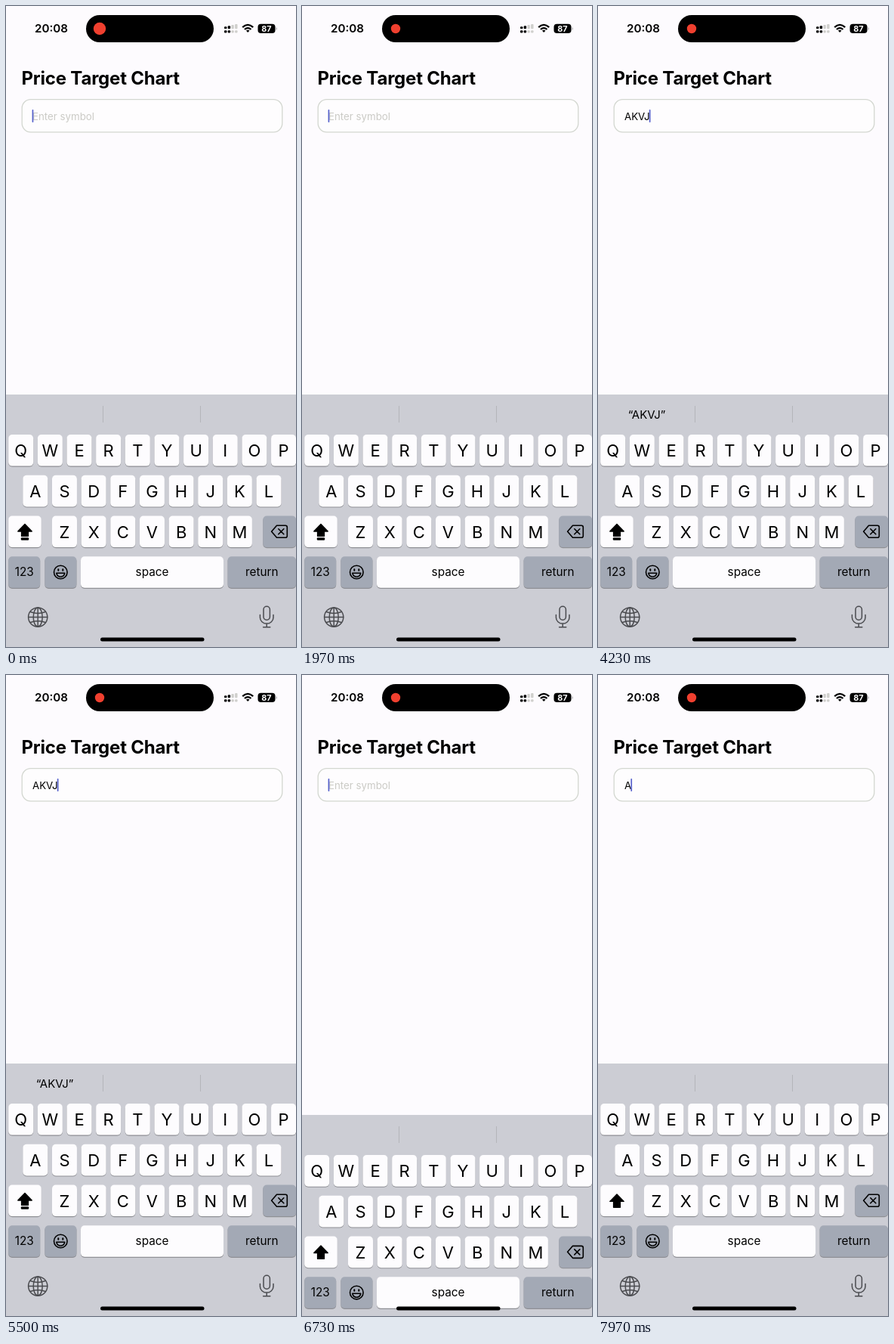
An HTML page that plays this animation: 384x848 px, repeating every 8 s.

```html
<!DOCTYPE html>
<html lang="en">
<head>
<meta charset="utf-8">
<title>Price Target Chart</title>
<style>
  html, body { margin: 0; width: 100%; height: 100%; overflow: hidden; background: #fdfbfe; }
  svg { display: block; width: 100vw; height: 100vh; }
  text { font-family: Inter, Roboto, sans-serif; fill: #000; }
  .mid { text-anchor: middle; }
  .letter { font-size: 22px; }
  .label { font-size: 15.3px; }
  .key { fill: #fdfcfe; }
  .special { fill: #a3a9b5; }
  .line { fill: none; stroke: #000; stroke-linecap: round; stroke-linejoin: round; }
  .soft { stroke: #4a4b4f; stroke-width: 1.5; }
</style>
</head>
<body>
<svg viewBox="0 0 384 848">
  <rect width="384" height="848" fill="#fdfbfe"/>

  <g id="status">
    <text class="mid" x="60" y="35.3" font-size="15.2" font-weight="600">20:08</text>
    <rect x="106" y="12" width="169" height="36" rx="18"/>
    <circle id="dot" cx="124" cy="30" fill="#f0402f"/>
    <g id="signal"></g>
    <path class="line" stroke-width="2.3" style="stroke-linecap:butt" d="M313.2 28.2Q320.2 21.6 327.2 28.2M315.9 31Q320.2 27.2 324.5 31"/>
    <path d="M317.9 32.6Q320.2 30.8 322.5 32.6L320.2 35Z"/>
    <rect x="333.5" y="23.7" width="23" height="12.4" rx="4"/>
    <path d="M357.5 28v4q1.5-.5 1.5-2t-1.5-2Z" fill="#b5b5b8"/>
    <text class="mid" x="345" y="33.8" font-size="10.8" font-weight="700" style="fill:#fff">87</text>
  </g>

  <text x="20.5" y="104" font-size="24" font-weight="700" letter-spacing="-.2">Price Target Chart</text>
  <rect x="21.2" y="123.6" width="344.6" height="43.2" rx="11.5" fill="#fefdfe" stroke="#d3d7d0" stroke-width="1.3"/>
  <text id="entry" x="35" y="150.5" font-size="13.3"></text>
  <rect id="caret" y="137" width="1.7" height="17" rx=".8" fill="#5560cc"/>

  <g id="keyboard">
    <rect y="514" width="384" height="336" fill="#cccdd4"/>
    <path d="M128.5 529v22M257.5 529v22" stroke="#b4b5ba"/>
    <text id="hint" class="mid" x="64.5" y="545.5" font-size="15"></text>
    <g id="keys"></g>

    <g id="lock">
      <path class="line" style="fill:#000" stroke-width="1.4" d="M25 685.5L34.2 695H29.4V701.2H20.6V695H15.8Z"/>
      <rect x="19.8" y="703.2" width="10.4" height="3.6" rx="1.2"/>
    </g>
    <path id="shift" class="line" style="fill:#000" stroke-width="1.4" d="M25 687L34.2 696.4H29.4V704.3H20.6V696.4H15.8Z"/>
    <path class="line" stroke-width="1.6" d="M358.5 687.3H370Q372.3 687.3 372.3 689.6V701Q372.3 703.3 370 703.3H358.5L351.6 695.3ZM360.8 691.8l7 7m0-7l-7 7"/>

    <g class="line" stroke-width="1.6">
      <circle cx="72.3" cy="749" r="8.8"/>
      <path d="M66.8 750.2H77.8Q76.8 755.2 72.3 755.2T66.8 750.2Z"/>
      <path d="M69.3 745.3v1.4m6-1.4v1.4" stroke-width="2"/>
    </g>

    <g class="line soft">
      <circle cx="42.2" cy="808.5" r="12.6"/>
      <ellipse cx="42.2" cy="808.5" rx="6" ry="12.6"/>
      <path d="M42.2 796v25M29.7 808.5h25M32.4 801.5Q42.2 805.5 52 801.5M32.4 815.5Q42.2 811.5 52 815.5"/>
      <rect x="341" y="794.2" width="8.4" height="18" rx="4.2"/>
      <path d="M336.4 805.5v3.4a8.8 8.2 0 0 0 17.6 0v-3.4M345.2 817.2v4.4M340.6 821.8h9.2"/>
    </g>
  </g>

  <rect x="125" y="835.4" width="137.5" height="5" rx="2.5"/>
</svg>

<script>
const LOOP = 8000;
const WORD = "AKVJ";
const KEYSTROKES = [3250, 3500, 3800, 4120];
const HIDE = 5866, SHOW = 6566, RETYPE = 7900;
const KEYBOARD_HEIGHT = 334;

const $ = id => document.getElementById(id);

function add(parent, tag, attrs, text = "") {
  const node = document.createElementNS("http://www.w3.org/2000/svg", tag);
  for (const name in attrs) node.setAttribute(name, attrs[name]);
  node.textContent = text;
  parent.append(node);
  return node;
}

function addKey(x, y, width, label = "", kind = "key", size = "label") {
  const box = { x, width, height: 41.6, rx: 5 };
  add($("keys"), "rect", { ...box, y: y + 1.1, fill: "#8f9095" });
  add($("keys"), "rect", { ...box, y, class: kind });
  const baseline = y + (size === "letter" ? 29 : 26);
  add($("keys"), "text", { x: x + width / 2, y: baseline, class: `mid ${size}` }, label);
}

[["QWERTYUIOP", 3.2, 567], ["ASDFGHJKL", 22.3, 620.8], ["ZXCVBNM", 61, 674.5]].forEach(([row, x, y]) =>
  [...row].forEach((letter, i) => addKey(x + i * 38.65, y, 33, letter, "key", "letter")));

addKey(3.2, 674.5, 43.6);
addKey(340.3, 674.5, 43.8, "", "special");
addKey(3.2, 728.2, 42, "123", "special");
addKey(51.4, 728.2, 42, "", "special");
addKey(99, 728.2, 189, "space");
addKey(293.6, 728.2, 90.4, "return", "special");

// Two SIMs: rising bars above a row of dots
for (let i = 0; i < 4; i++) {
  const bar = { x: 289 + i * 4.7, width: 3.4, rx: 1, fill: i < 2 ? "#000" : "#cfcfcc" };
  const height = 3 + i * 1.1;
  add($("signal"), "rect", { ...bar, y: 30.3 - height, height });
  add($("signal"), "rect", { ...bar, y: 32.2, height: 3.4 });
}

// Critically damped spring from 0 to 1
function spring(ms) {
  const s = Math.max(0, ms) * 0.018;
  return 1 - (1 + s) * Math.exp(-s);
}

function typedCount(t) {
  if (t >= RETYPE) return 1;
  return t < HIDE ? KEYSTROKES.filter(k => t >= k).length : 0;
}

// Solid for half a second after each event, then fading in and out once a second
function caretOpacity(t) {
  if (t >= HIDE && t < SHOW) return 0;
  const start = [-50, ...KEYSTROKES, SHOW, RETYPE].filter(k => t >= k).pop();
  const phase = (t - start) % 1000;
  const ramp = phase < 800 ? (650 - phase) / 150 : (phase - 850) / 100;
  return Math.min(1, Math.max(0, ramp));
}

function draw(t) {
  const typed = WORD.slice(0, typedCount(t));
  const entry = $("entry");
  entry.textContent = typed || "Enter symbol";
  entry.style.fill = typed ? "#000" : "#cbcbc6";
  $("caret").setAttribute("x", typed ? 34.2 + entry.getComputedTextLength() : 34.6);
  $("caret").style.opacity = caretOpacity(t);
  $("hint").textContent = typed.length > 1 ? `“${typed}”` : "";

  const hidden = t < SHOW ? spring(t - HIDE) : 1 - spring(t - SHOW);
  $("keyboard").setAttribute("transform", `translate(0 ${hidden * KEYBOARD_HEIGHT})`);

  const locked = t < SHOW;
  $("lock").style.display = locked ? "" : "none";
  $("shift").style.display = locked ? "none" : "";

  $("dot").setAttribute("r", 8.2 - 2 * spring(t));
}

const begin = performance.now();
function tick() {
  draw((performance.now() - begin) % LOOP);
  requestAnimationFrame(tick);
}
tick();
</script>
</body>
</html>
```
